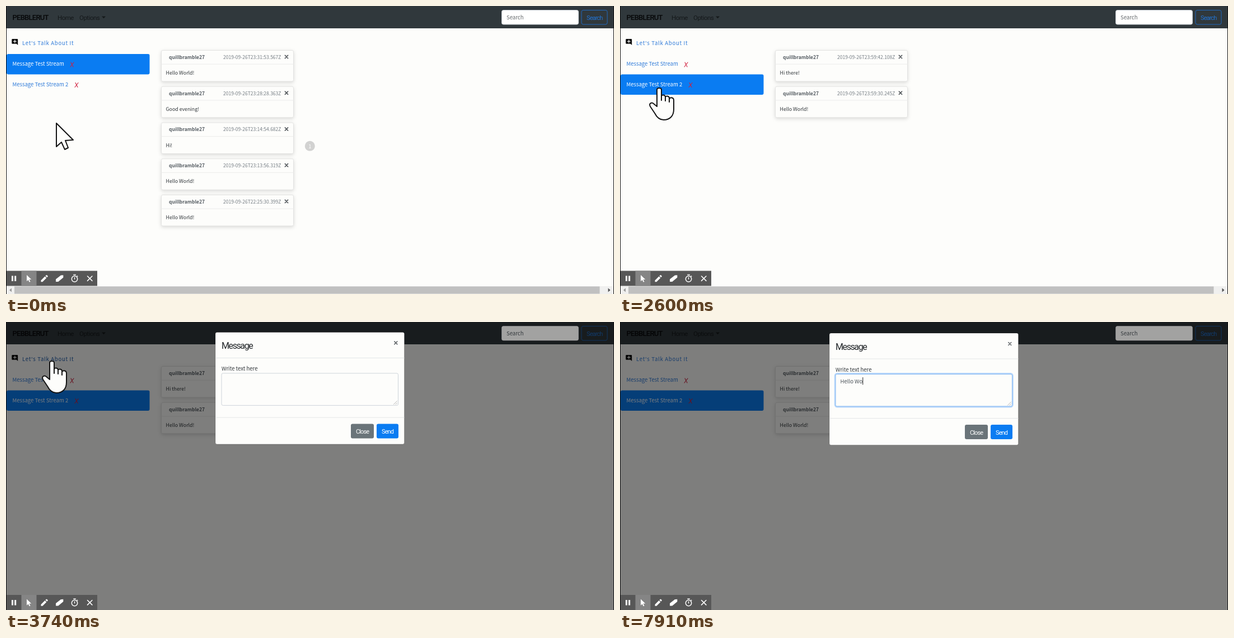
Write an HTML page that moves like this. It is 1086 by 516 pixels and loops after 8000 ms.

```html
<!DOCTYPE html>
<html lang="en">
<head>
<meta charset="utf-8">
<title>Message streams</title>
<style>
  html, body { margin: 0; width: 100%; height: 100%; overflow: hidden; background: #fdfdfb; }
  svg { display: block; width: 100%; height: 100%; }
  text { font: 9.55px "Noto Sans CJK SC", "Noto Sans CJK JP", "Noto Sans", sans-serif; fill: #33383c; white-space: pre; }
  .narrow { font-family: Roboto, sans-serif; font-size: 11px; letter-spacing: -.9px; }
  .nav { font-size: 11.5px; letter-spacing: -.5px; fill: #15191b; }
  .brand { font-size: 13px; letter-spacing: -.75px; font-weight: 500; fill: #060708; }
  .title { font-size: 16px; letter-spacing: -1.4px; fill: #24282b; }
  .small { font-size: 8.5px; }
  .user { font-weight: 700; fill: #565d63; }
  .stamp { fill: #757d84; }
  .body { font-size: 8.8px; }
  .white { fill: #fff; }
  .line { fill: none; stroke-linecap: round; stroke-linejoin: round; }
  .card { filter: drop-shadow(0 2px 3px rgba(0, 0, 0, .14)); }
</style>
</head>
<body>
<svg id="stage" viewBox="0 0 1086 516" xmlns="http://www.w3.org/2000/svg"></svg>
<script>
const LOOP = 8000;
const BLUE = '#0a7cf2', LINK = '#2f7bd9', HOVER = '#1d5aa8', PAPER = '#fdfdfb';
const USER = 'quillbramble27';

const rect = (x, y, w, h, fill, extra = '') =>
  `<rect x="${x}" y="${y}" width="${w}" height="${h}" fill="${fill}" ${extra}/>`;
const text = (x, y, str, cls = '', extra = '') =>
  `<text x="${x}" y="${y}" class="${cls}" ${extra}>${str}</text>`;
const line = (d, color, width = 1, extra = '') =>
  `<path class="line" d="${d}" stroke="${color}" stroke-width="${width}" ${extra}/>`;
const cross = (x, y, r, color, width) =>
  line(`M${x - r} ${y - r}L${x + r} ${y + r}M${x + r} ${y - r}L${x - r} ${y + r}`, color, width);
const redCross = (x, y) =>
  line(`M${x - 2} ${y - 4}Q${x} ${y} ${x + 2} ${y + 4}M${x + 3} ${y - 4}L${x - 3} ${y + 4}`, '#d0213f', 1.1);

function card([time, message], i) {
  const y = 79 + 64.75 * i;
  return rect(277.5, y + .5, 236, 55.5, PAPER, 'rx="2.5" stroke="#e3e3e2" class="card"') +
    line(`M278 ${y + 25.2}H513`, '#ececeb') +
    text(291, y + 15.8, USER, 'small user') +
    text(388, y + 15.8, `2019-09-26T${time}Z`, 'small stamp') +
    cross(501, y + 12, 2.6, '#555a5e', 1.6) +
    text(285.5, y + 44, message, 'body');
}
const cards = (id, list) => `<g id="${id}">${list.map(card).join('')}</g>`;

const navbar = rect(0, 0, 1086, 40, '#30383c') +
  text(11.5, 25, 'PEBBLERUT', 'narrow brand') +
  text(92, 25, 'Home', 'narrow nav') +
  text(131, 25, 'Options', 'narrow nav') +
  '<path d="M171 18.5h7l-3.5 3.7z" fill="#15191b"/>' +
  rect(885.5, 7.5, 137, 25.5, '#fff', 'rx="3" stroke="#ced4da"') +
  text(894, 23.8, 'Search', '', 'fill-opacity=".75"') +
  rect(1028, 7.5, 46, 25.5, 'none', 'rx="3" stroke="#2069be"') +
  text(1037, 24.8, 'Search', 'narrow', 'style="fill:#2273d2"');

const sidebar = '<path d="M11.5 59h8.5q1.2 0 1.2 1.2V70l-2.4-2.3h-7.3q-1.2 0-1.2-1.2v-6.3q0-1.2 1.2-1.2z" fill="#0b0b0b"/>' +
  line('M15.8 61v4.8M13.4 63.4h4.8', PAPER, 1.2) +
  text(29, 70, "Let's Talk About It", '', 'id="talk" letter-spacing=".72"') +
  rect(1, 86, 255.5, 36.5, BLUE, 'id="active" rx="3"') +
  text(11.5, 107, 'Message Test Stream', '', 'id="tab1"') + redCross(118, 105) +
  text(11.5, 143.6, 'Message Test Stream 2', '', 'id="tab2"') + redCross(126, 141.5);

const scrollbar = `<g id="scrollbar">${rect(0, 502, 1086, 14, '#f0f0ef')}${rect(15, 502.5, 1045.5, 13, '#c0c0c0')}
  <path d="M10 505.5v7l-4-3.5z" fill="#9a9a9a"/><path d="M1075.5 505.5v7l4-3.5z" fill="#505050"/></g>`;

const toolbar = `<g id="toolbar">${rect(1, 474.5, 162, 27, '#575757')}${rect(27.5, 474.5, 27, 27, '#858585')}
  ${rect(10, 483.5, 3, 9.5, '#fff')}${rect(15.2, 483.5, 3, 9.5, '#fff')}
  <path d="M37 482v11.2l2.7-2.4 2 4 1.8-.9-2-3.9h3.8z" fill="#fff"/>
  <path d="M62.5 494.3v-2.8l7-7 2.8 2.8-7 7zM70.4 483.6l1.5-1.4q.6-.5 1.2 0l1.5 1.5q.5.6 0 1.1l-1.4 1.5z" fill="#fff"/>
  <path d="M89 489.5l9-7 4.3-.3v4.3l-9 7.5h-4.3z" fill="#fff"/>
  <circle cx="122.5" cy="489" r="5.2" fill="none" stroke="#fff" stroke-width="1.5"/>
  ${line('M120.8 481.5h3.5M122.5 486.5v2.8M127 483.8l.8.8', '#fff', 1.4)}${cross(149.7, 488.2, 4.2, '#fff', 1.6)}</g>`;

const modal = `<g id="modal">
  ${rect(374, 20, 337.5, 200.5, PAPER, 'rx="3" stroke="#000" stroke-opacity=".2"')}
  ${text(385, 49.8, 'Message', 'narrow title')}${cross(696.3, 39, 2.5, '#5d6266', 1.5)}
  ${line('M374.5 66H711M374.5 172.7H711', '#e4e6e7')}
  ${text(385, 89, 'Write text here')}
  <g id="ring">${rect(384, 92.3, 317.5, 60, 'none', 'rx="4" stroke="#b9d8fb" stroke-width="2.6"')}</g>
  ${rect(385, 93.5, 315.5, 57.5, PAPER, 'id="field" rx="2.5"')}
  ${line('M692.5 149.2l6-6M696 149.2l2.5-2.5', '#999', .7)}
  ${text(393.5, 109.8, '', '', 'id="typed" style="fill:#495057"')}
  ${line('M0 99.5V112', '#222', 1, 'id="caret"')}
  ${rect(616, 184, 41, 26, '#6a7479', 'rx="3"')}${text(625, 201.8, 'Close', 'narrow white')}
  ${rect(662, 184, 39, 26, BLUE, 'rx="3"')}${text(671, 201.8, 'Send', 'narrow white')}</g>`;

const pointer = (id, d) => `<path id="${id}" d="${d}" fill="${PAPER}" stroke="#151515" stroke-width="2" stroke-linejoin="round"/>`;

const stage = document.getElementById('stage');
stage.innerHTML = rect(0, 0, 1086, 516, PAPER) + navbar + sidebar +
  cards('stream1', [['23:31:53.567', 'Hello World!'], ['23:28:28.363', 'Good evening!'], ['23:14:54.682', 'Hi!'],
    ['23:13:56.319', 'Hello World!'], ['22:25:30.399', 'Hello World!']]) +
  cards('stream2', [['23:59:42.108', 'Hi there!'], ['23:59:30.245', 'Hello World!']]) +
  `<g id="badge"><circle cx="542.8" cy="250.8" r="9" fill="#d2d2d1"/>${text(540.2, 254.5, '1', 'white')}</g>` +
  scrollbar + rect(0, 0, 1086, 516, '#000', 'id="backdrop"') +
  `<g id="litInput">${rect(885.5, 7.5, 137, 25.5, '#a2a2a1', 'rx="3"')}${text(894, 23.8, 'Search')}</g>` +
  modal + toolbar +
  line('M.5 0V516M1085.5 0V516', '#111') +
  '<circle id="click" r="22" fill="none" stroke="#ef7f86" stroke-width="3.6"/>' +
  '<g id="cursor">' + pointer('arrow', 'M0 0V42L9 34L15 47L21 44L16 31L30 30Z') +
  pointer('hand', 'M-3 33V3C-3-1 5-1 5 3V22 15C5 11 12 12 12 16V23 17C12 13 19 14 19 18V25 20C19 16 27 16 27 22V38C27 50 20 57 9 57C1 57-4 51-7 45L-15 33C-18 27-12 25-9 28Z') + '</g>';

const el = Object.fromEntries([...stage.querySelectorAll('[id]')].map(node => [node.id, node]));
const show = (node, on) => node.setAttribute('display', on ? 'inline' : 'none');
const move = (node, x, y) => node.setAttribute('transform', `translate(${x} ${y})`);
const between = (t, a, b) => t >= a && t < b;

// Cursor path: time, x, y
const path = [[0, 90, 210], [150, 90, 210], [1050, 67.5, 147], [2550, 67.5, 147], [2640, 70, 147],
  [2800, 70, 147], [3010, 81, 70], [4480, 81, 70], [4700, 430, 108], [LOOP, 430, 108]];
function cursorAt(t) {
  const i = path.findIndex(key => key[0] > t);
  const [t0, x0, y0] = path[i - 1], [t1, x1, y1] = path[i];
  const p = (t - t0) / (t1 - t0), e = p * p * (3 - 2 * p);
  return [x0 + (x1 - x0) * e, y0 + (y1 - y0) * e];
}

const keyTimes = [5900, 6060, 6210, 6370, 6530, 6700, 6860, 7740];

function draw(t) {
  const second = t >= 1440, open = t >= 3580;
  const [x, y] = cursorAt(t);
  const hand = y < 159 && t < 4480;

  el.badge.setAttribute('opacity', Math.max(0, Math.min(1, (400 - t) / 300)));
  move(el.active, 0, second ? 36.5 : 0);
  el.tab1.style.fill = second ? LINK : '#fff';
  el.tab2.style.fill = second ? '#fff' : hand ? HOVER : LINK;
  el.talk.style.fill = between(t, 3010, 4480) ? HOVER : LINK;
  show(el.stream1, t < 1760);
  show(el.stream2, t >= 1760);

  move(el.cursor, x, y);
  show(el.cursor, t < 4850);
  show(el.hand, hand);
  show(el.arrow, !hand);
  move(el.click, x + 1, y);
  show(el.click, between(t, 1290, 1440) || between(t, 3150, 3580));

  const entering = t < 3740;
  show(el.scrollbar, !open);
  move(el.toolbar, 0, open ? 14.5 : 0);
  show(el.backdrop, open);
  el.backdrop.setAttribute('opacity', entering ? .28 : .5);
  show(el.litInput, open && !entering);
  show(el.modal, open);
  el.modal.setAttribute('opacity', entering ? .57 : 1);
  move(el.modal, 0, entering ? -20 : t < 3900 ? -1.6 : 0);

  const focused = t >= 4700;
  show(el.ring, focused);
  el.field.setAttribute('stroke', focused ? '#82b6f0' : '#ced4da');
  el.typed.textContent = 'Hello Wo'.slice(0, keyTimes.filter(k => k <= t).length);
  show(el.caret, between(t, 4700, 5210) || between(t, 5720, 7390) || t >= 7740);
  move(el.caret, 394 + (open ? el.typed.getComputedTextLength() : 0), 0);
}

function tick() {
  draw(performance.now() % LOOP);
  requestAnimationFrame(tick);
}
tick();
</script>
</body>
</html>
```
